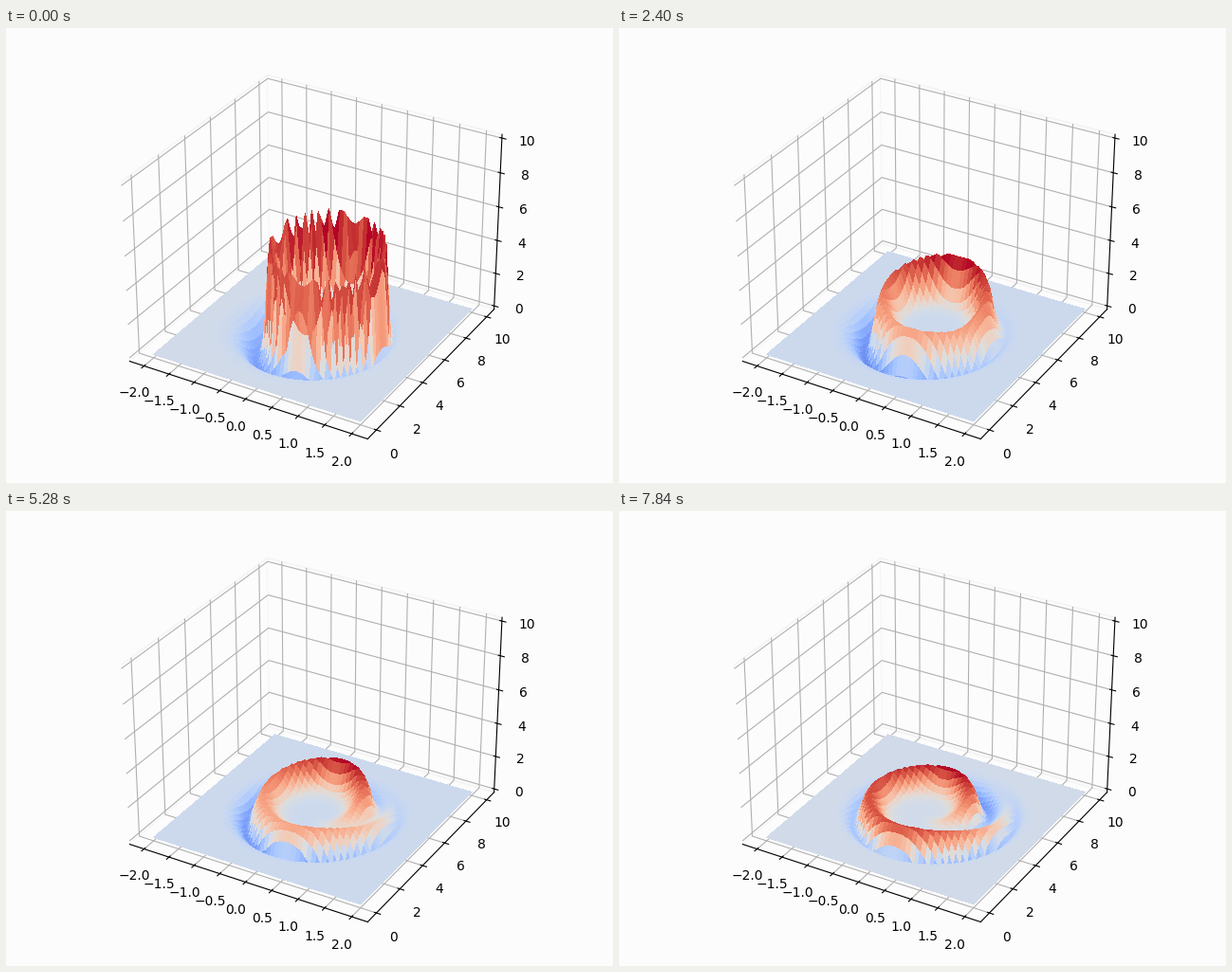
These frames come from a looping animation (640 px wide and 480 px high, 8000 ms). A matplotlib script:

```python
import numpy as np
import matplotlib.pyplot as plt
from matplotlib.animation import FuncAnimation
from mpl_toolkits.mplot3d.art3d import Poly3DCollection

FRAMES, STEP = 50, 160
PAPER = "#fcfcfc"
N = 50

fig = plt.figure(figsize=(6.4, 4.8), dpi=100, facecolor=PAPER)
side = 446.7
ax = fig.add_axes([0.5 - side / 1280, 18.3 / 480, side / 640, side / 480],
                  projection="3d", facecolor=PAPER)
ax.view_init(elev=30, azim=-60)

ax.set_xticks(np.arange(-2, 2.1, 0.5))
ax.set_yticks(np.arange(0, 11, 2))
ax.set_zticks(np.arange(0, 11, 2))
pad = 25 / 24
ax.set_xlim(-2.2 * pad, 2.2 * pad)
ax.set_ylim(5 - 5.5 * pad, 5 + 5.5 * pad)
ax.set_zlim(5 - 5 * pad, 5 + 5 * pad)
for axis in (ax.xaxis, ax.yaxis, ax.zaxis):
    axis.set_pane_color(PAPER)
    axis.pane.set_edgecolor("#f3f3f3")

# Polar coordinates on the floor, turned towards the viewer
X, Y = np.meshgrid(np.linspace(-2, 2, N), np.linspace(0, 10, N))
U, V = 61.3 * X, 24.5 * (Y - 5)
across = 0.866 * U + 0.5 * V
depth = -0.5 * U + 0.866 * V
R = np.hypot(across, depth)
PSI = np.degrees(np.arctan2(depth, across))
TURN = (PSI + 110) % 360


def cosd(a):
    return np.cos(np.radians(a))


def smooth(v):
    v = np.clip(v, 0, 1)
    return v * v * (3 - 2 * v)


def arm(turn, t):
    """One winding: a crest inside its zero line and a trough outside."""
    mix = t / 8
    late = np.clip((t - 4) / 4, 0, 1)
    amp = 5.4 / (1 + 0.34 * t)
    dip = 0.8 * amp / (1 + 0.2 * amp)

    ring = 64 + 13 * cosd(PSI) + 10 * cosd(PSI - 90)
    spiral = 50 + 0.085 * turn - 30 * np.exp(-turn / 60)
    edge = (1 - mix) * ring + mix * spiral

    swing = 0.08 + 0.2 * np.sin(np.pi * mix)
    crest = amp * (1 - swing + swing * cosd(PSI - 65 + 40 * mix))
    left = 0.62 + 0.38 * cosd(PSI - 200)
    right = 0.70 + 0.30 * cosd(PSI + 10)
    trough = dip * ((1 - late) * left + late * right)

    w_in = 5 + 7.5 * (1 - np.exp(-t / 1.6))
    w_out = np.maximum((88 + 2 * mix - edge) / 3.2, 3.5)
    q = R - edge
    s = np.maximum(-q, 0) / w_in
    p = np.maximum(q, 0) / w_out
    return (crest * s * np.exp((1 - s * s) / 2)
            - trough * p * np.exp((1 - p ** 1.5) / 1.5))


def height(t):
    share = smooth(TURN / 165)
    return share * arm(TURN, t) + (1 - share) * arm(TURN + 360, t)


def facets(Z):
    P = np.stack([X, Y, Z], axis=-1)
    quads = np.stack([P[:-1, :-1], P[:-1, 1:], P[1:, 1:], P[1:, :-1]], axis=2)
    return quads.reshape(-1, 4, 3)


surface = Poly3DCollection(facets(height(0)), cmap="coolwarm",
                           linewidth=0, antialiased=False)
ax.add_collection3d(surface)


def draw(i):
    t = i * STEP / 1000
    quads = facets(height(t))
    mean = quads[:, :, 2].mean(axis=1)
    # Share of the colour range that lies below zero
    level = np.interp(t, [0, 1.1, 2.4, 5.3, 6.9, 7.84],
                      [0.455, 0.455, 0.44, 0.44, 0.42, 0.455])
    top = mean.max()
    surface.set_verts(quads)
    surface.set_array(mean)
    surface.set_clim(-top * level / (1 - level), top)
    return surface,


anim = FuncAnimation(fig, draw, frames=FRAMES, interval=STEP,
                     repeat=True, repeat_delay=0, blit=False)
plt.show()
```
